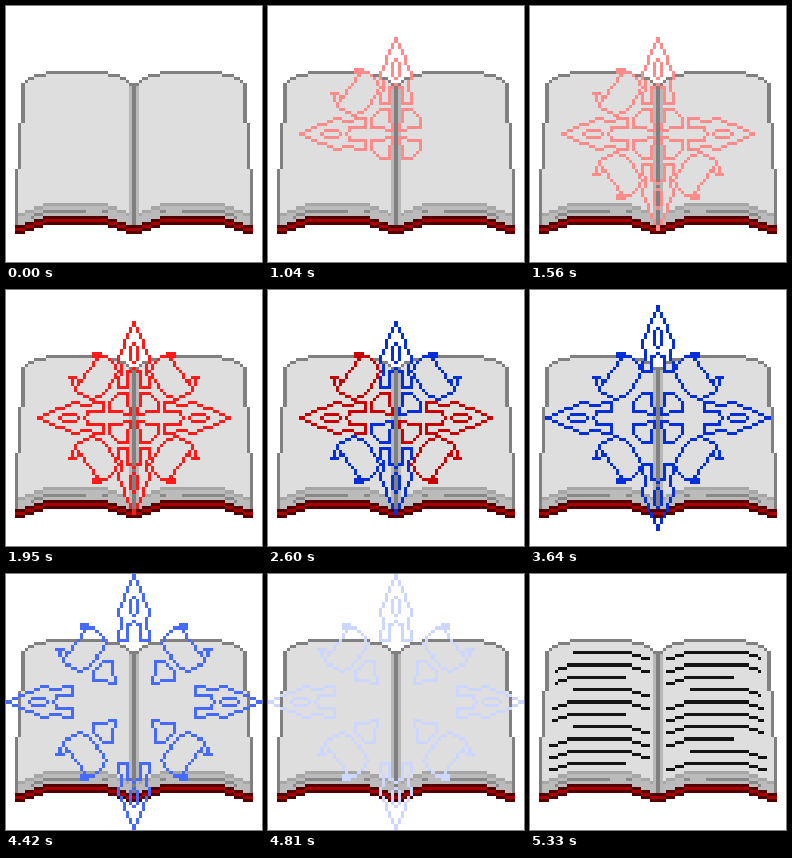
These frames come from a looping animation (256 px wide and 256 px high, 5720 ms). An HTML page with a canvas:

```html
<!DOCTYPE html>
<html lang="en">
<head>
<meta charset="utf-8">
<title>Spell book</title>
<style>
html, body { margin: 0; height: 100%; overflow: hidden; background: #fff; }
canvas { display: block; width: 100vw; height: 100vh; image-rendering: pixelated; }
</style>
</head>
<body>
<canvas id="stage" width="83" height="83"></canvas>
<script>
const ctx = document.getElementById('stage').getContext('2d');
const LOOP = 5720, TICK = 130, SIZE = 83, MID = 41;

const clamp = (v, lo, hi) => Math.max(lo, Math.min(hi, v));

function cell(x, y, w = 1, h = 1) { ctx.fillRect(x, y, w, h); }

// Paint the same cells on both halves of the book
function both(color, x, y, w, h) {
  ctx.fillStyle = color;
  cell(x, y, w, h);
  cell(SIZE - x - w, y, w, h);
}

// Page curves of the left half: the top rounds off, the bottom sags at both ends
function topRow(x) {
  const inset = clamp(Math.min(x - 5, 40 - x), 0, 8);
  return 25 - Math.ceil(Math.log2(inset + 1));
}
function drop(x) {
  return clamp(Math.ceil((9 - Math.min(x - 3, MID - x)) / 3), 0, 3);
}
// The page gets wider in three steps
const margin = row => row < 38 ? 5 : row < 53 ? 4 : 3;

function drawBook() {
  ctx.fillStyle = '#fff';
  cell(0, 0, SIZE, SIZE);
  for (let x = 3; x <= MID; x++) {
    const d = drop(x), top = x < 4 ? 53 : x < 5 ? 38 : topRow(x);
    both('#dedede', x, top, 1, 64 + d - top);
    both('#a6a6a6', x, 64 + d, 1, 1);
    both('#bbbbbb', x, 65 + d, 1, 3);
    if (x > 7 && x < 33 && (x < 26 || x > 30)) both('#888888', x, 66 + d, 1, 1);
    both('#500000', x, 68 + d, 1, 3);
    both('#a80000', x, 69 + d, 1, 1);
    both('#808080', x, top, 1, 1);
  }
  for (let row = 25; row < 71; row++) both('#808080', margin(row), row, 1, 1);
  both('#b8b8b8', 40, 26, 1, 45);
  both('#808080', MID, 25, 1, 46);
}

function stroke(points, place) {
  for (let i = 1; i < points.length; i++) {
    const [ax, ay] = points[i - 1], [bx, by] = points[i];
    const n = Math.max(Math.abs(bx - ax), Math.abs(by - ay));
    for (let k = 0; k <= n; k++) {
      cell(...place(Math.round(ax + (bx - ax) * k / n), Math.round(ay + (by - ay) * k / n)));
    }
  }
}

// Half outlines of the blade and its gem, measured from the tip
const blade = [[0, 0], [5, 12], [4, 14], [4, 17], [5, 19], [5, 21], [2, 21], [2, 16], [0, 15]];
const gem = [[0, 7], [1, 9], [1, 12], [0, 13]];
// Upper left corner shapes
const hook = [[10, 1], [8, 1], [8, 0], [10, 0], [13, 2], [16, 6], [12, 12], [8, 15],
  [3, 13], [0, 8], [2, 8], [3, 10], [9, 2]];
const petal = [[3, 0], [6, 0], [6, 4], [7, 5], [7, 7], [5, 7], [4, 6], [0, 6], [0, 3], [3, 0]];

// dx, dy: unit vector the blade points to
function drawBlade([dx, dy], out) {
  for (const side of [-1, 1]) {
    const place = (x, y) => {
      const r = 31 + out - y, s = x * side;
      return [MID + dx * r - dy * s, MID + dy * r + dx * s];
    };
    stroke(blade, place);
    stroke(gem, place);
  }
}

// The signs mirror a corner shape into its quarter
function drawCorner(points, inset, [sx, sy]) {
  stroke(points, (x, y) => [MID + sx * (inset - x), MID + sy * (inset - y)]);
}

const UP = [0, -1], DOWN = [0, 1], LEFT = [-1, 0], RIGHT = [1, 0];
const UL = [-1, -1], UR = [1, -1], LL = [-1, 1], LR = [1, 1];

// Parts in order of appearance
const parts = [
  ['petal', UL], ['petal', UR], ['petal', LL], ['petal', LR],
  ['blade', UP], ['blade', LEFT], ['hook', UL], ['blade', DOWN],
  ['hook', LL], ['hook', LR], ['blade', RIGHT], ['hook', UR]
];

// Pink deepens to red, the two sets of parts swap red and blue, then blue pales
function partColor(tick, [dx, dy]) {
  const firstSet = dx === dy || dy === 0;
  const swap = Math.floor((tick - 18) / 2) % 2 === 0;
  const blue = tick >= 26 || (tick >= 18 && swap === firstSet);
  return blue
    ? `hsl(228, 96%, ${clamp(63 + 9 * (tick - 34), tick < 34 ? 43 : 63, tick < 34 ? 43 : 90)}%)`
    : `hsl(0, 100%, ${clamp(77 - 11 * (tick - 13), 39, 77)}%)`;
}

function drawSeal(tick) {
  if (tick < 2 || tick >= 38) return;
  const bladeOut = 5 * clamp(tick - 27, 0, 2);
  const hookOut = 2 * clamp(tick - 28, 0, 2);
  const petalOut = tick < 32 ? 0 : 5;
  for (const [kind, dir] of parts.slice(0, tick - 1)) {
    ctx.fillStyle = partColor(tick, dir);
    if (kind === 'blade') drawBlade(dir, bladeOut);
    else if (kind === 'hook') drawCorner(hook, 21 + hookOut, dir);
    else drawCorner(petal, 8 + petalOut, dir);
  }
}

// A paragraph starts indented and the line before it ends early
function drawPage(left, right, starts, shortEnd) {
  for (let i = 0; i < 10; i++) {
    const row = 25 + 4 * i, edge = margin(row) + 3;
    const from = starts.includes(i) ? left + 8 : Math.max(left, edge);
    const to = starts.includes(i + 1) ? shortEnd : Math.min(right, 82 - edge);
    for (let x = from; x <= to; x++) cell(x, row + drop(Math.min(x, 82 - x)));
  }
}

function drawText(tick) {
  if (tick < 39) return;
  ctx.fillStyle = `hsl(0, 0%, ${clamp(62 - 27 * (tick - 39), 8, 62)}%)`;
  drawPage(6, 38, [0, 3, 6, 10], 30);
  drawPage(44, 76, [3, 8], 65);
}

let last = -1;
const begin = performance.now();
function frame() {
  const tick = Math.floor(((performance.now() - begin) % LOOP) / TICK);
  if (tick !== last) {
    last = tick;
    drawBook();
    drawSeal(tick);
    drawText(tick);
  }
  requestAnimationFrame(frame);
}
frame();
</script>
</body>
</html>
```
